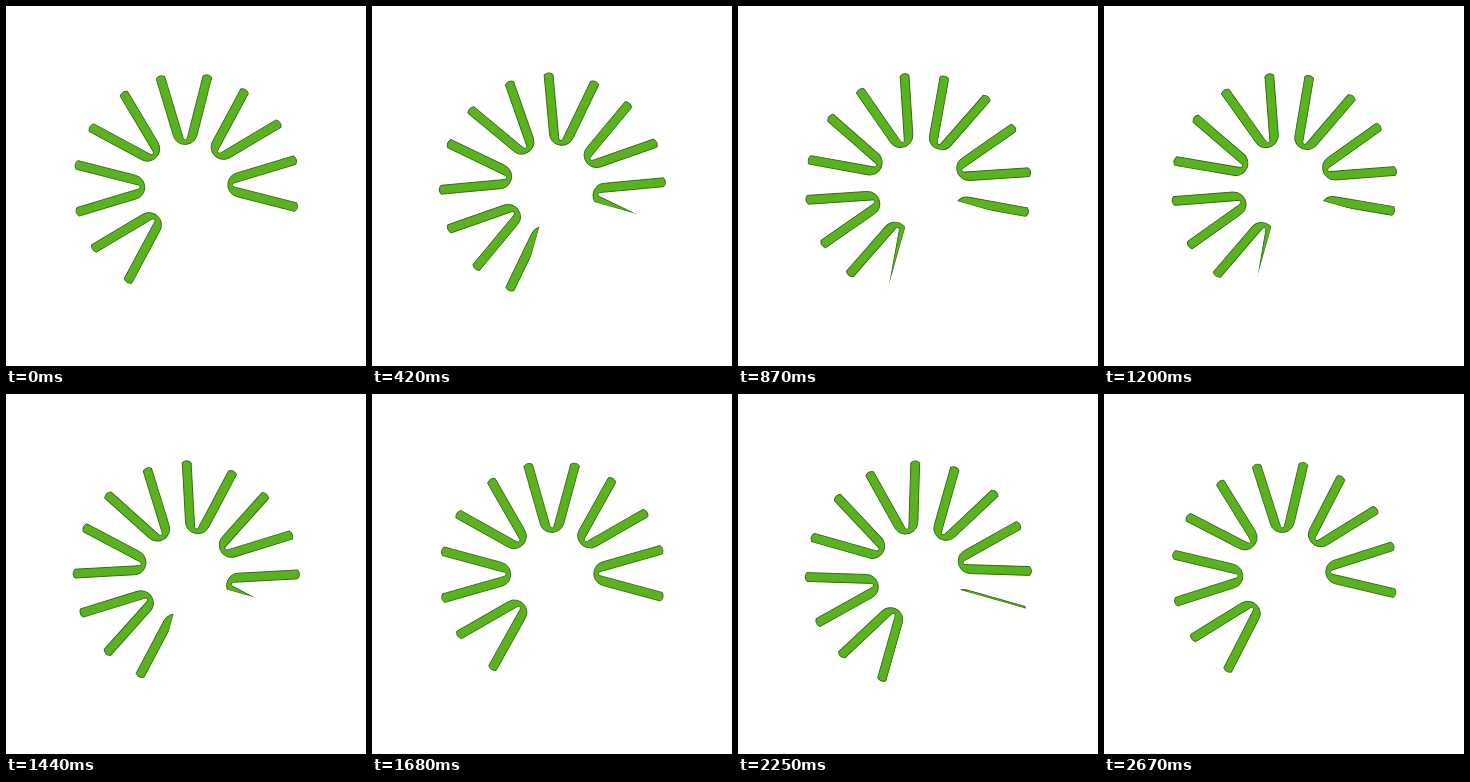
An HTML page with a canvas that plays this animation: 360x360 px, repeating every 2.7 s.

```html
<!DOCTYPE html>
<html lang="en">
<head>
<meta charset="utf-8">
<title>Rotating spokes</title>
<style>
  html, body { margin: 0; width: 100%; height: 100%; overflow: hidden; background: #fff; }
  canvas { display: block; width: 360px; height: 360px; }
</style>
</head>
<body>
<canvas id="stage" width="360" height="360"></canvas>
<script>
const ctx = document.getElementById('stage').getContext('2d');
const DEG = Math.PI / 180;
const CX = 180.3, CY = 180;
const STEPS = 90, STEP_MS = 30;
const PHASE = -1.25, TURN = 359 / 89;  // degrees, clockwise
const COUNT = 8;
const FLARE = 15.5 * DEG;              // half opening of one hairpin
const RIM = 111.5, BULGE = 115;
const FILL = '#5ab31e', EDGE = '#336a14';

// Point where a hairpin edge, tangent to a circle at (c, 0), meets the rim.
function rimPoint({ c, r }) {
  const p = r - c * Math.sin(FLARE);
  const s = Math.sqrt(RIM * RIM - p * p);
  return [s * Math.cos(FLARE) - p * Math.sin(FLARE), s * Math.sin(FLARE) + p * Math.cos(FLARE)];
}

function makeHairpin() {
  const path = new Path2D();
  const outer = { c: 53.8, r: 12.3 }, inner = { c: 48.2, r: 2 };
  const [ox, oy] = rimPoint(outer);
  const [ix, iy] = rimPoint(inner);
  const k = BULGE / RIM / 2;
  const mx = (ox + ix) * k, my = (oy + iy) * k;
  const from = Math.PI / 2 + FLARE;
  path.moveTo(ox, oy);
  path.arc(outer.c, 0, outer.r, from, -from);
  path.lineTo(ox, -oy);
  path.quadraticCurveTo(mx, -my, ix, -iy);
  path.arc(inner.c, 0, inner.r, -from, from, true);
  path.lineTo(ix, iy);
  path.quadraticCurveTo(mx, my, ox, oy);
  path.closePath();
  return path;
}

// Everything except the lower right quarter, relative to the centre.
function makeWindow() {
  const path = new Path2D(), a = 15.9 * DEG, x = -2.3, y = 3.2;
  path.moveTo(x, y);
  path.arc(x, y, 300, a + Math.PI / 2, a + 2 * Math.PI);
  path.closePath();
  return path;
}

const hairpin = makeHairpin(), view = makeWindow();

function outline(path) {
  ctx.strokeStyle = EDGE;
  ctx.lineWidth = 0.9;
  ctx.stroke(path);
}

function drawHairpin(angle) {
  ctx.save();
  ctx.rotate(angle);
  ctx.fillStyle = FILL;
  ctx.fill(hairpin);
  outline(hairpin);
  ctx.clip(hairpin);
  ctx.rotate(-angle);
  outline(view);
  ctx.restore();
}

function draw() {
  const step = Math.floor(performance.now() / STEP_MS) % STEPS;
  ctx.fillStyle = '#fff';
  ctx.fillRect(0, 0, 360, 360);
  ctx.save();
  ctx.lineJoin = 'round';
  ctx.translate(CX, CY);
  ctx.clip(view);
  for (let i = 0; i < COUNT; i++) {
    drawHairpin((PHASE + step * TURN + i * 360 / COUNT) * DEG);
  }
  ctx.restore();
  requestAnimationFrame(draw);
}
draw();
</script>
</body>
</html>
```
